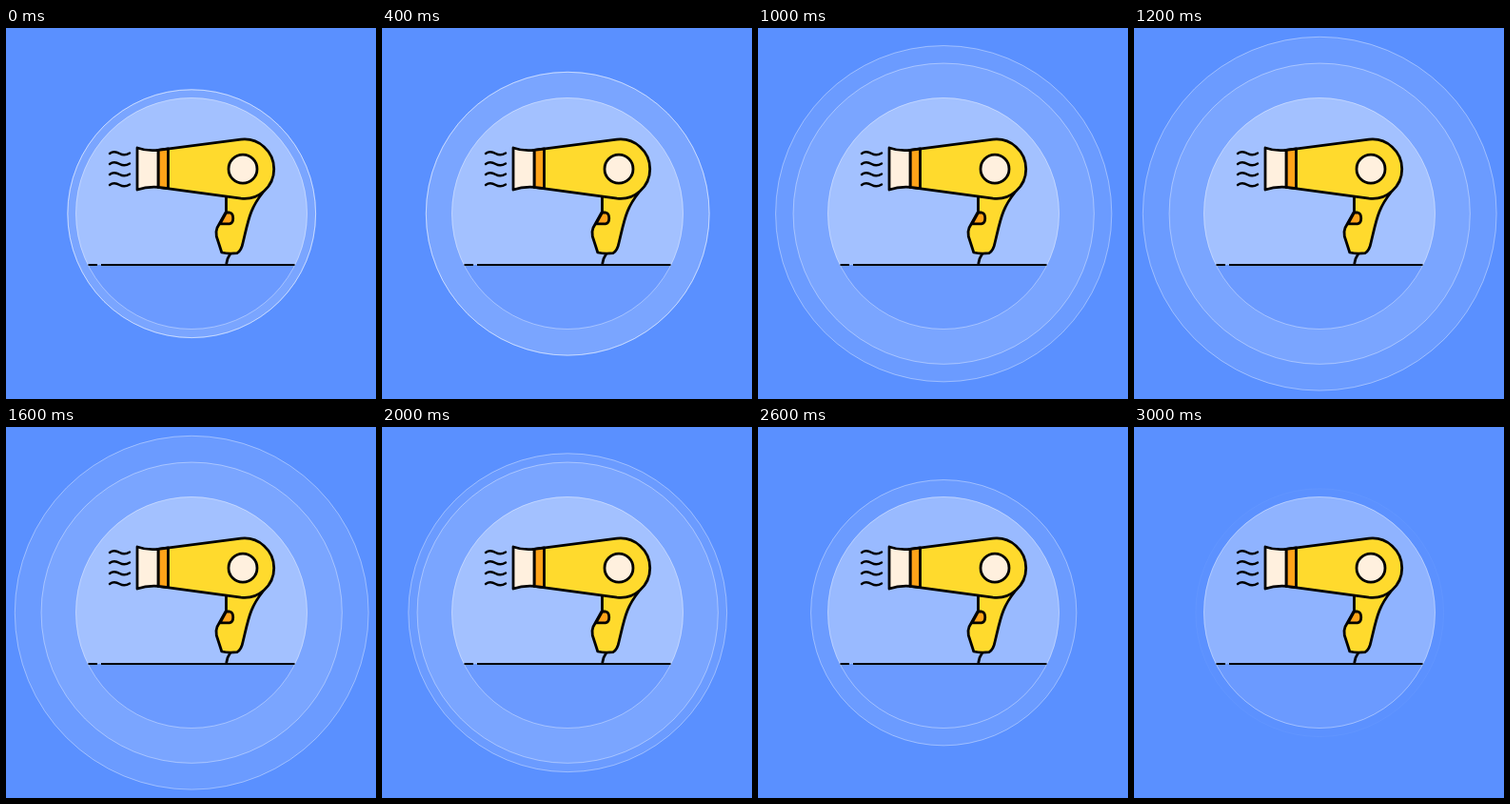
Animation, 389 px wide and 390 px high, one loop 3200 ms. Source, as an HTML page:

```html
<!DOCTYPE html>
<html lang="en">
<head>
<meta charset="utf-8">
<title>Hair dryer</title>
<style>
  html, body { margin: 0; width: 100%; height: 100%; overflow: hidden; background: #5a90ff; }
  svg { display: block; }
  .ring { fill: #fff; fill-opacity: .1; stroke: #fff; stroke-opacity: .38; }
  .ink { stroke: #000; stroke-width: 2.8; stroke-linejoin: round; stroke-linecap: round; }
</style>
</head>
<body>
<svg width="389" height="390" viewBox="0 0 389 390">
  <circle id="outer" class="ring" cx="195.2" cy="195.2"/>
  <circle id="inner" class="ring" cx="195.2" cy="195.2"/>

  <clipPath id="disc"><circle cx="195" cy="195" r="121.7"/></clipPath>
  <g clip-path="url(#disc)">
    <path d="M70 70H320V249H70Z" fill="#fff" fill-opacity=".31"/>
    <path d="M70 249H320V320H70Z" fill="#6b9aff"/>
  </g>
  <circle cx="195" cy="195" r="121.5" fill="none" stroke="#fff" stroke-opacity=".38"/>
  <path d="M86.5 249H96M100 249H303.5" stroke="#000" stroke-width="2"/>

  <g class="ink" fill="none">
    <path d="M236 237Q232.5 242 231.8 247.5"/>
    <path fill="#ffda2d" d="M231.5 176V193L222 210Q220.3 214 221.3 219L226.8 236Q234 237.8 243 236.6Q247.5 234 249 226C252 214 254 203 258 193Q262 183 270 173Z"/>
    <path fill="#ffa319" d="M231.5 194H235C240 195 240 205 235 205.8H225Z"/>
    <path fill="#ffda2d" d="M160 128.3L247 117.2A31.2 31.2 0 1 1 247 179.2L160 167.3Z"/>
    <path fill="#ffa319" d="M160 128.3L170.5 127V168.7L160 167.3Z"/>
    <path fill="#fff0de" d="M138 126Q148 129.5 160 128.3V167.3Q148 166.5 138 170Z"/>
    <circle fill="#fff0de" cx="249" cy="148.2" r="15"/>
    <path id="air" stroke-width="2.4" style="stroke-width:2.4"/>
  </g>
</svg>
<script>
  const STEP = 200, STEPS = 16, PEAK = 7, HOLD = 3;
  const get = id => document.getElementById(id);
  const radius = n => Math.min(130.4 + 9.25 * n, 193.8);

  get('air').setAttribute('d', [132, 143, 154, 165]
    .map(y => `M109 ${y}C113 ${y - 3} 116 ${y - 2} 119.5 ${y}S126 ${y + 2} 130 ${y - .5}`).join(''));

  function setRing(id, n, opacity) {
    get(id).setAttribute('r', radius(n));
    get(id).setAttribute('opacity', opacity);
  }

  function draw(now) {
    const i = Math.floor(now / STEP) % STEPS;
    const size = i <= PEAK ? i : Math.max(2 * PEAK - i, 0);
    // On the way back the outer ring vanishes once it meets the inner one.
    setRing('outer', size, i < 2 * PEAK - HOLD ? 1 : 0);
    setRing('inner', Math.min(size, HOLD), i <= 2 * PEAK ? 1 : .1);
    requestAnimationFrame(draw);
  }
  draw(performance.now());
</script>
</body>
</html>
```
